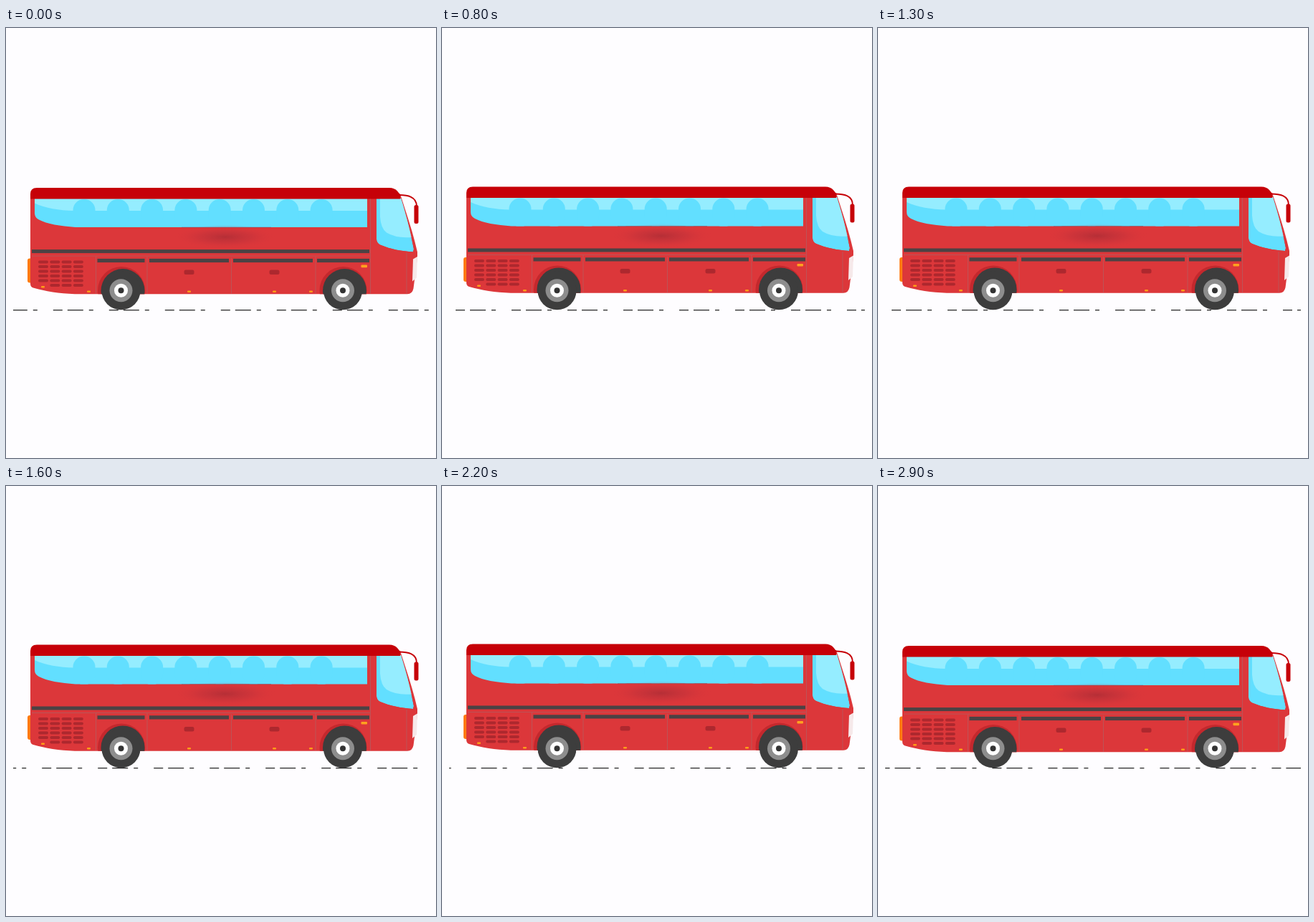
Recreate the animation shown at these times as an HTML page. Size 600x600 px, loop 3000 ms.

```html
<!DOCTYPE html>
<html lang="en">
<head>
<meta charset="utf-8">
<title>Red coach</title>
<style>
  html, body { margin: 0; width: 100%; height: 100%; overflow: hidden; background: #fefdff; }
  svg { display: block; width: 100vw; height: 100vh; }
</style>
</head>
<body>
<svg viewBox="0 0 600 600">
  <defs>
    <radialGradient id="smear">
      <stop offset="0" stop-color="#a92c35" stop-opacity=".75"/>
      <stop offset=".5" stop-color="#b9303a" stop-opacity=".4"/>
      <stop offset="1" stop-color="#dc373a" stop-opacity="0"/>
    </radialGradient>
    <clipPath id="glass">
      <path d="M40 236H504V276.5H97C76 275 57 272 46 266Q40 263 40 257Z"/>
    </clipPath>
    <clipPath id="screen">
      <path id="screenShape" d="M517 236H551C558 258 564 281 569 307L568 311C552 310 536 307 522 301Q517 298 517 293Z"/>
    </clipPath>
    <clipPath id="skirt"><rect x="120" y="320" width="390" height="49.7"/></clipPath>
    <g id="wheel">
      <circle r="27" fill="#3d3d3d"/>
      <circle r="16" fill="#8d8d8d"/>
      <circle r="9.5" fill="#fff"/>
      <circle r="4" fill="#333"/>
    </g>
  </defs>

  <path id="road" d="M10 393.7H590" stroke="#262626" stroke-width="1.3" stroke-dasharray="13 7 22 8 6 22"/>

  <g id="bus">
    <rect x="30" y="320" width="8" height="34" rx="3" fill="#ff7a12"/>
    <path fill="#dc373a" d="M34 230H550C559 258 568 284 574 311V319L568.5 362Q567 369.7 560 369.7H96C74 369 55 366 38 361Q34 360 34 355Z"/>
    <path d="M546 231.5C561 231 573 234 573 247" fill="none" stroke="#c60008" stroke-width="2"/>
    <rect x="569.5" y="245.5" width="6" height="26" rx="2.5" fill="#c60008"/>

    <g clip-path="url(#glass)">
      <rect x="40" y="236" width="464" height="41" fill="#62dfff"/>
      <path d="M40 236H504V253.5H95C74 253 55 250 40 243Z" fill="#95edff"/>
      <g id="seats" fill="#62dfff"></g>
    </g>
    <g clip-path="url(#screen)">
      <use href="#screenShape" fill="#62dfff"/>
      <path d="M522 236H555L570 290Q546 293 531 284Q523 278 522 262Z" fill="#95edff"/>
    </g>

    <path fill="#c60008" d="M34 237V230Q34 221.5 43 221.5H535Q542 221.5 546 226L550 231V237Z"/>

    <ellipse cx="306" cy="290" rx="72" ry="17" fill="url(#smear)"/>
    <path d="M245 276.6H370" stroke="#8d4a58" stroke-width="1" opacity=".6"/>

    <path d="M36 316.5H508M125.5 317V369M197 317V369M314.5 319V369M432 317V369M508.5 237V369M559 312V369"
          fill="none" stroke="#b9575b" stroke-width=".9"/>
    <g id="trim"></g>

    <path d="M568 321L574 317.5L573 347L567 352Z" fill="#f6e9ea"/>
    <g id="wells" clip-path="url(#skirt)"></g>
  </g>

  <use href="#wheel" x="160.5" y="366.3"/>
  <use href="#wheel" x="470" y="366.3"/>
</svg>
<script>
  const $ = id => document.getElementById(id);

  function add(parent, tag, attrs) {
    const el = document.createElementNS("http://www.w3.org/2000/svg", tag);
    for (const key in attrs) el.setAttribute(key, attrs[key]);
    $(parent).append(el);
  }
  const bar = (x, y, width, height, fill, rx = 0) =>
    add("trim", "rect", { x, y, width, height, fill, rx });

  for (let i = 0; i < 8; i++) {
    add("seats", "rect", { x: 93.5 + i * 47.3, y: 237.5, width: 31, height: 40, rx: 15 });
  }

  // Side strips
  bar(36, 307.5, 471, 5, "#4b4244");
  for (const [x, w] of [[127.5, 66], [200, 111], [317, 111], [434, 73]]) {
    bar(x, 320.3, w, 5.2, "#4b4244");
  }

  // Engine grille
  for (let row = 0; row < 6; row++) {
    for (let col = 0; col < 4; col++) {
      if (row < 5 || col) bar(45 + col * 16.3, 323 + row * 6.5, 14, 4, "#ad282e", 2);
    }
  }

  // Hatch handles and marker lamps
  for (const x of [248.5, 367.5]) bar(x, 336, 14, 6.5, "#ad282e", 2.5);
  for (const x of [113, 253, 372, 423]) bar(x, 365, 5, 2.4, "#ff9d18", 1);
  bar(49, 358.5, 5, 2.4, "#ff9d18", 1);
  bar(495.5, 329, 8.5, 3.6, "#ffa21f", 1);

  for (const x of [161, 470.5]) {
    add("wells", "circle", { cx: x, cy: 364.5, r: 33, fill: "#c4282d" });
    add("wells", "circle", { cx: x + 2, cy: 365, r: 30.5, fill: "#3d3d3d" });
  }

  const PERIOD = 500, STEP = 100, GAP = 78;
  const start = performance.now();

  function draw(now) {
    const elapsed = Math.max(0, now - start);
    const phase = Math.floor(elapsed / STEP) * STEP % PERIOD / PERIOD;
    const bob = 0.45 + 1.43 * Math.cos(2 * Math.PI * (phase - 0.9));
    $("bus").setAttribute("transform", `translate(0 ${bob.toFixed(2)})`);
    $("road").setAttribute("stroke-dashoffset", (GAP * (phase + 1) - 55.8).toFixed(2));
    requestAnimationFrame(draw);
  }
  draw(start);
</script>
</body>
</html>
```
